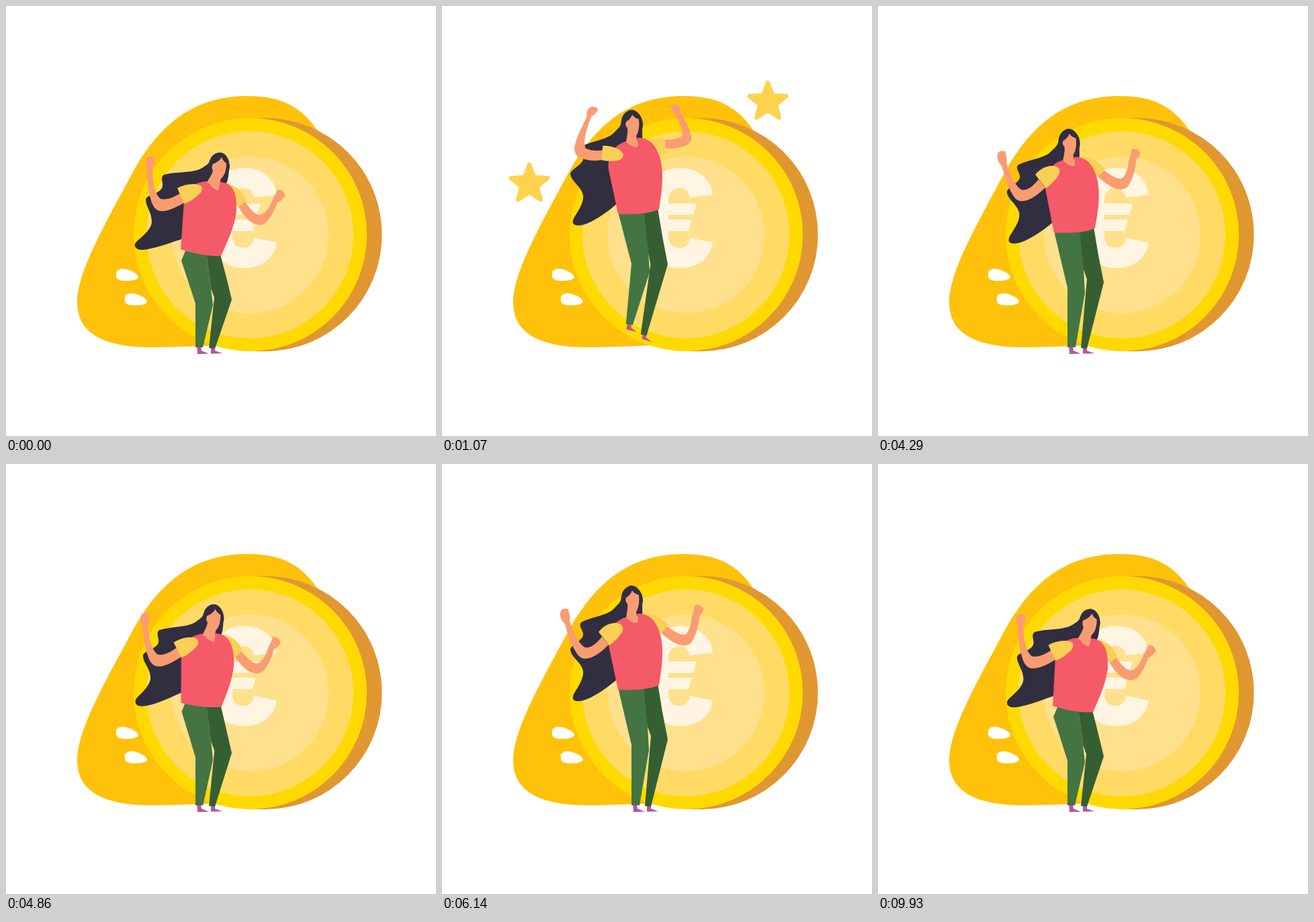
Animation of 640 by 640 pixels, one loop 10 s. Source, as an HTML page:

```html
<!DOCTYPE html>
<html lang="en">
<head>
<meta charset="utf-8">
<title>Jump for joy</title>
<style>
  html, body { margin: 0; height: 100%; overflow: hidden; background: #fff; }
  svg { display: block; width: 100%; height: 100%; }
</style>
</head>
<body>
<svg viewBox="0 0 640 640">
  <path fill="#ffc10a" d="M106 441C106 395 150 320 190 245C235 165 290 134 360 134C410 134 440 150 464 186L400 400L330 504C290 506 250 508 218 508C150 508 106 490 106 441Z"/>
  <g fill="#fff">
    <path id="pill" d="M164 399C163 394 168 391 174 391C184 392 197 398 197 404C194 409 184 409 174 409C166 408 163 405 164 399Z"/>
    <use href="#pill" x="13" y="36.5"/>
  </g>
  <g fill="#e09731"><circle cx="386" cy="340.3" r="173.6"/><path d="M370 166.7H386V514H370Z"/></g>
  <circle cx="363.5" cy="340.3" r="173.6" fill="#ffd900"/>
  <circle cx="363" cy="340.6" r="154" fill="#ffdb66"/>
  <circle cx="363.3" cy="340.6" r="116.7" fill="#ffe08c"/>
  <path fill="#fff5e2" d="M403 281C400 256 380 241 354 241C325 241 304 262 304 292V340C304 370 325 390 354 390C381 390 399 376 403 352L369 345C368 355 362 360 354 360C344 360 337 354 337 343V335H367L372 318H337V311H374L379 294H337V288C337 277 344 271 354 271C362 271 367 276 369 285Z"/>
  <g id="stars" fill="#ffd24d" stroke="#ffd24d" stroke-width="6" stroke-linejoin="round">
    <path id="star" transform="translate(130 154)"/>
    <use href="#star" x="355" y="-122"/>
  </g>
  <g id="legs"></g>
  <g id="upper"></g>
</svg>
<script>
const byId = id => document.getElementById(id);
const [stars, star, legs, upper] = ['stars', 'star', 'legs', 'upper'].map(byId);
const SKIN = '#fa9c72', YELLOW = '#f9d055', SHOE = '#b4579b';
const NUMBER = /[\d.]+/g;
const clamp = x => Math.min(1, Math.max(0, x));
const smooth = x => (x = clamp(x), x * x * (3 - 2 * x));

star.setAttribute('d', 'M' + Array.from({ length: 10 }, (_, i) => {
  const r = i % 2 ? 12.5 : 29, a = i * Math.PI / 5;
  return [r * Math.sin(a), -r * Math.cos(a)].map(v => v.toFixed(1));
}).join('L') + 'Z');

// A part morphs from rest to crouch, and optionally to a third pose
// (legs in the air, arms raised) by the amount blend(state, index).
const parts = [];
function part(group, fill, rest, crouch, third = rest, blend = () => 0) {
  const el = document.createElementNS('http://www.w3.org/2000/svg', 'path');
  el.setAttribute('fill', fill);
  group.append(el);
  const [r, c, x] = [rest, crouch, third].map(d => d.match(NUMBER).map(Number));
  parts.push(state => {
    let i = 0;
    el.setAttribute('d', rest.replace(NUMBER, () => {
      const v = r[i] + (c[i] - r[i]) * Math.max(0, -state.pose) + (x[i] - r[i]) * blend(state, i);
      i++;
      return v.toFixed(2);
    }));
  });
}

const air = s => Math.max(0, s.pose);
const foot = s => air(s) ** 2;
const leg = (s, i) => i > 7 && i < 12 ? foot(s) : air(s);
const raised = s => s.raise;

const leftShoe = 'M284 506L290 506L291 513L302 517.5L285 518Z';
const rightShoe = 'M305 508L311 508L311 513L322 517L305 517.5Z';
part(legs, SHOE, leftShoe, leftShoe, 'M263 417L268 420L267 425L271 434L258 424Z', foot);
part(legs, SHOE, rightShoe, rightShoe, 'M289 456L294 458L292 463L297 474L286 461Z', foot);
part(legs, '#355f33',
  'M299 332L321 326L328 369L336 410L311 510L302 509L311 405L305 388Z',
  'M298 368L319 370L328 404L336 437L311 510L302 509L310 434L305 420Z',
  'M300 290L321 285L328 327L336 369L294 460L286 457L310 372L306 345Z', leg);
part(legs, '#447442',
  'M264 334L300 332L306 390L308 426L294 508L282 508L282 418L263 337Z',
  'M268 362L298 368L305 420L308 445L293 508L282 508L282 443L261 379Z',
  'M264 292L301 290L307 345L310 377L268 422L261 418L282 363L263 294Z', leg);

part(upper, '#312e40',
  'M281 181C290 180 300 192 299 205C297 212 299 218 298 224L270 232L250 255L268 314C255 326 222 353 203 353C192 353 193 346 200 336C206 326 211 317 210 308C207 294 192 288 191 276C193 268 212 262 210 252C209 246 203 241 207 236C220 228 245 226 255 216C265 206 266 206 267 197C268 188 275 182 281 181Z',
  'M319 218C328 219 333 229 333 240C331 246 332 256 328 264L300 268L280 290L268 345C250 350 225 361 203 363C191 363 189 355 195 350C206 341 216 331 217 322C217 306 208 299 208 288C210 280 231 280 233 268C234 262 229 256 235 251C255 246 280 249 292 241C303 234 301 235 304 228C307 221 313 218 319 218Z');
// right arm and sleeve
part(upper, SKIN,
  'M336 242C346 250 355 255 362 254C368 250 371 238 372 227C375 222 375 216 376 210C382 208 389 212 389 217C387 222 384 225 383 227C382 243 377 258 370 267C364 271 357 271 350 268C341 264 333 258 326 251Z',
  'M356 291C363 302 370 311 378 311C388 308 394 297 397 287C401 282 402 277 404 274C409 272 416 278 415 283C411 289 407 292 404 292C400 303 393 317 386 323C381 327 373 326 367 323C358 317 351 308 346 299Z',
  'M331 221C342 220 352 216 357 210C356 200 347 187 341 178C336 175 332 171 330 167C332 162 341 161 346 168C347 172 347 173 348 176C358 185 368 200 372 212C372 219 369 223 362 227C353 232 343 234 333 235Z', raised);
part(upper, YELLOW,
  'M306 224C320 224 330 232 337 240L326 252L312 246Z',
  'M328 264C340 267 351 273 357 290L346 299L335 290Z',
  'M310 226C320 223 325 222 330 221L335 245L320 247Z', raised);
// shirt, then face and neck
part(upper, '#f55a68',
  'M274 228C280 234 286 237 291 236C292 232 291 227 290 223C310 220 328 240 328 280C328 300 325 315 323 329C308 336 285 337 262 336L248 270C246 255 252 234 274 228Z',
  'M299 261C302 266 308 271 315 274C317 270 318 266 318 262C338 263 344 278 343 305C340 330 329 352 320 372C300 373 278 368 260 362L265 290C266 275 278 262 299 261Z');
part(upper, SKIN,
  'M283 188C285 192 290 194 293 195C294 205 293 214 289 220C290 225 291 230 291 236L283 235L274 229C275 222 277 214 276 208C273 205 272 201 275 198C279 196 282 192 283 188Z',
  'M321 225C322 229 325 232 328 234C328 243 326 252 320 257C318 262 318 268 316 274L309 271L299 262C303 256 307 250 308 245C306 242 306 238 308 235C314 233 319 229 321 225Z');
// left arm and sleeve
part(upper, SKIN,
  'M238 257C228 270 220 274 213 273C203 268 195 249 190 233C191 227 189 222 188 216C181 214 176 216 176 224C176 231 181 236 183 238C187 255 193 270 200 281C206 291 213 291 222 288C232 284 240 277 248 269Z',
  'M259 279C247 286 238 289 230 287C221 280 218 260 218 242C221 236 222 230 221 225C215 222 208 225 208 231C208 238 210 241 210 243C210 260 212 278 217 293C222 305 228 306 237 305C247 303 256 298 265 293Z',
  'M239 237C228 235 220 233 214 229C211 217 222 194 231 180C237 178 242 175 244 171C241 165 234 164 228 169C224 173 225 178 224 180C213 195 200 213 196 228C196 239 201 242 210 246C219 250 228 252 236 252Z', raised);
part(upper, YELLOW,
  'M233 250C240 241 250 235 262 237C273 240 270 249 264 256C260 261 255 266 249 270Z',
  'M255 271C266 265 280 263 290 267C295 273 290 279 283 284C277 289 271 293 265 294Z',
  'M241 230C252 233 263 237 269 245C273 255 266 258 259 257C250 257 242 255 234 252Z', raised);

// -1 crouched, 0 standing, 1 top of the jump; u = 0 is the deepest crouch
function poseAt(u) {
  if (u < 0) return -smooth((u + 455) / 455);
  if (u < 800) return 2 * smooth(u / 800) - 1;
  return 1 - smooth((u - 800) / 650);
}

function render(time) {
  const t = Math.floor((time + 5) * 14 / 1000) * 1000 / 14 % 10000;
  const u = t < 2000 ? t : t < 8000 ? t - 4680 : t - 10000;
  const state = {
    pose: poseAt(u),
    raise: 1.15 * smooth((t - 200) / 660) * (1 - smooth((t - 860) / 570)),
  };
  parts.forEach(draw => draw(state));
  upper.setAttribute('transform', `translate(0 ${-42.5 * air(state)})`);

  const age = t - (t < 2000 ? 620 : 5098);
  stars.setAttribute('transform', `translate(0 ${194 - 0.184 * age})`);
  stars.setAttribute('opacity', clamp(age / 150) * clamp((680 - age) / 150));
}

const start = performance.now();
(function frame() {
  render((performance.now() - start) % 10000);
  requestAnimationFrame(frame);
})();
</script>
</body>
</html>
```
